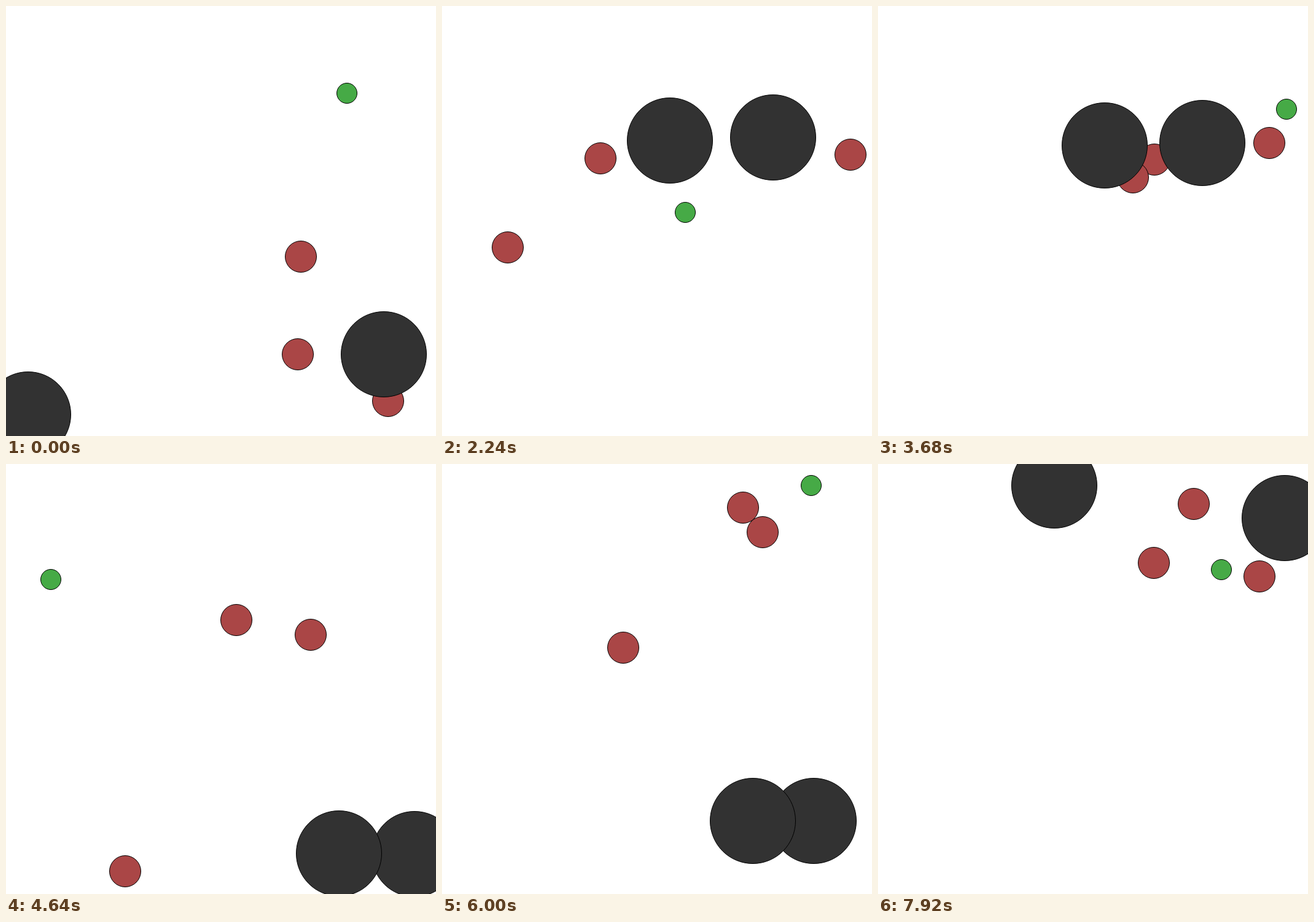
These frames come from a looping animation (700 by 700 pixels, 8 s). An HTML page with a canvas:

```html
<!DOCTYPE html>
<html lang="en">
<head>
<meta charset="utf-8">
<title>Pursuit</title>
<style>
html, body { margin: 0; width: 100%; height: 100%; overflow: hidden; background: #fff; }
canvas { display: block; }
</style>
</head>
<body>
<canvas id="stage" width="700" height="700"></canvas>
<script>
const STEP = 80, STEPS = 100, MID = 350, REACH = 315, PACE = 8;
const RED = { r: 26, fill: '#aa4646' };
const GREEN = { r: 17, fill: '#46aa46' };
const ROCK = { r: 70, fill: '#323232' };

// Key points are [step, x, y], measured from the centre.
const rounds = [
  {
    start: 0,
    rocks: [[265.5, 217.7], [-313.5, 315]],
    chasers: [
      [[0, 130, 58], [16, -201, -147.7]],
      [[0, 125, 217], [16, -263.9, 83.7]],
      [[0, 272, 293], [16, 68.8, 296.9]]
    ],
    runner: [[0, 205, -208], [16, -335.8, -189.2], [24, -345, -335]]
  },
  {
    start: 25,
    rocks: [[21.2, -130.5], [189.8, -135.2]],
    chasers: [
      [[28, -92, -102], [46, 107.1, -106]],
      [[28, -243, 43], [33, -88, 43], [46, 69.8, -75.1]],
      [[28, 315, -108], [46, 306.3, -134.8]]
    ],
    runner: [[25, 35, -25], [28, 46, -14], [38, 240, -50], [43, 300, -216], [46, 335.6, -193.4], [50, 325, -251]]
  },
  {
    start: 51,
    rocks: [[315, 285.3], [192.6, 284.8]],
    chasers: [
      [[58, 25, -96], [75, 173, -343]],
      [[58, 146, -72], [75, 212.4, -293.7]],
      [[58, -156, 313], [66, -235, 130], [75, -67.1, -62.2]]
    ],
    runner: [[51, -318, -130], [58, -277, -162], [66, 0, -329], [75, 309.7, -387.9]]
  },
  {
    start: 77,
    rocks: [[-63, -315], [312, -262]],
    chasers: [
      [[77, 30, 20], [99, 164, -285]],
      [[77, -285, 247], [99, 99, -189]],
      [[77, 382, 40], [99, 271, -167]]
    ],
    runner: [[77, 180, 80], [99, 209, -178]]
  }
];

const ctx = document.getElementById('stage').getContext('2d');

function slope(path, i, axis) {
  const a = path[Math.max(i - 1, 0)];
  const b = path[Math.min(i + 1, path.length - 1)];
  const v = (b[axis] - a[axis]) / (b[0] - a[0]);
  return i === 0 ? v / 2 : v; // slow start
}

// Smooth curve through the key points, held at both ends.
function along(path, n) {
  const t = Math.min(Math.max(n, path[0][0]), path[path.length - 1][0]);
  let i = 0;
  while (i < path.length - 2 && t >= path[i + 1][0]) i++;
  const a = path[i], b = path[i + 1];
  const span = b[0] - a[0], s = (t - a[0]) / span, q = 1 - s;
  return [1, 2].map(k =>
    a[k] * (1 + 2 * s) * q * q + b[k] * s * s * (3 - 2 * s) +
    span * s * q * (slope(path, i, k) * q - slope(path, i + 1, k) * s));
}

// Outside its key points a chaser heads straight for the runner.
function chase(path, prey, n) {
  const [x, y] = along(path, n);
  const first = path[0][0], last = path[path.length - 1][0];
  const steps = Math.min(n - first, 0) + Math.max(n - last, 0);
  const dx = prey[0] - x, dy = prey[1] - y;
  const move = steps * PACE / Math.hypot(dx, dy);
  return [x + dx * move, y + dy * move];
}

function disc(x, y, kind) {
  ctx.beginPath();
  ctx.arc(x, y, kind.r - 0.5, 0, Math.PI * 2);
  ctx.fillStyle = kind.fill;
  ctx.fill();
  ctx.stroke();
}

function draw(n) {
  const round = rounds.filter(r => r.start <= n).pop();
  const prey = along(round.runner, n);
  const items = [
    ...round.chasers.map(p => [chase(p, prey, n), RED]),
    [prey, GREEN],
    ...round.rocks.map(p => [p, ROCK])
  ];
  // The view zooms so that the farthest item sits at the edge.
  const far = Math.max(...items.flatMap(([p]) => p.map(Math.abs)));
  const place = v => Math.floor(MID + v / far * REACH + 1e-6);

  ctx.fillStyle = '#fff';
  ctx.fillRect(0, 0, 700, 700);
  ctx.strokeStyle = '#000';
  ctx.lineWidth = 1;
  for (const [[x, y], kind] of items) disc(place(x), place(y), kind);
}

const begin = performance.now();
function tick() {
  const t = Math.max(0, performance.now() - begin);
  draw(Math.floor(t / STEP) % STEPS);
  requestAnimationFrame(tick);
}
tick();
</script>
</body>
</html>
```
